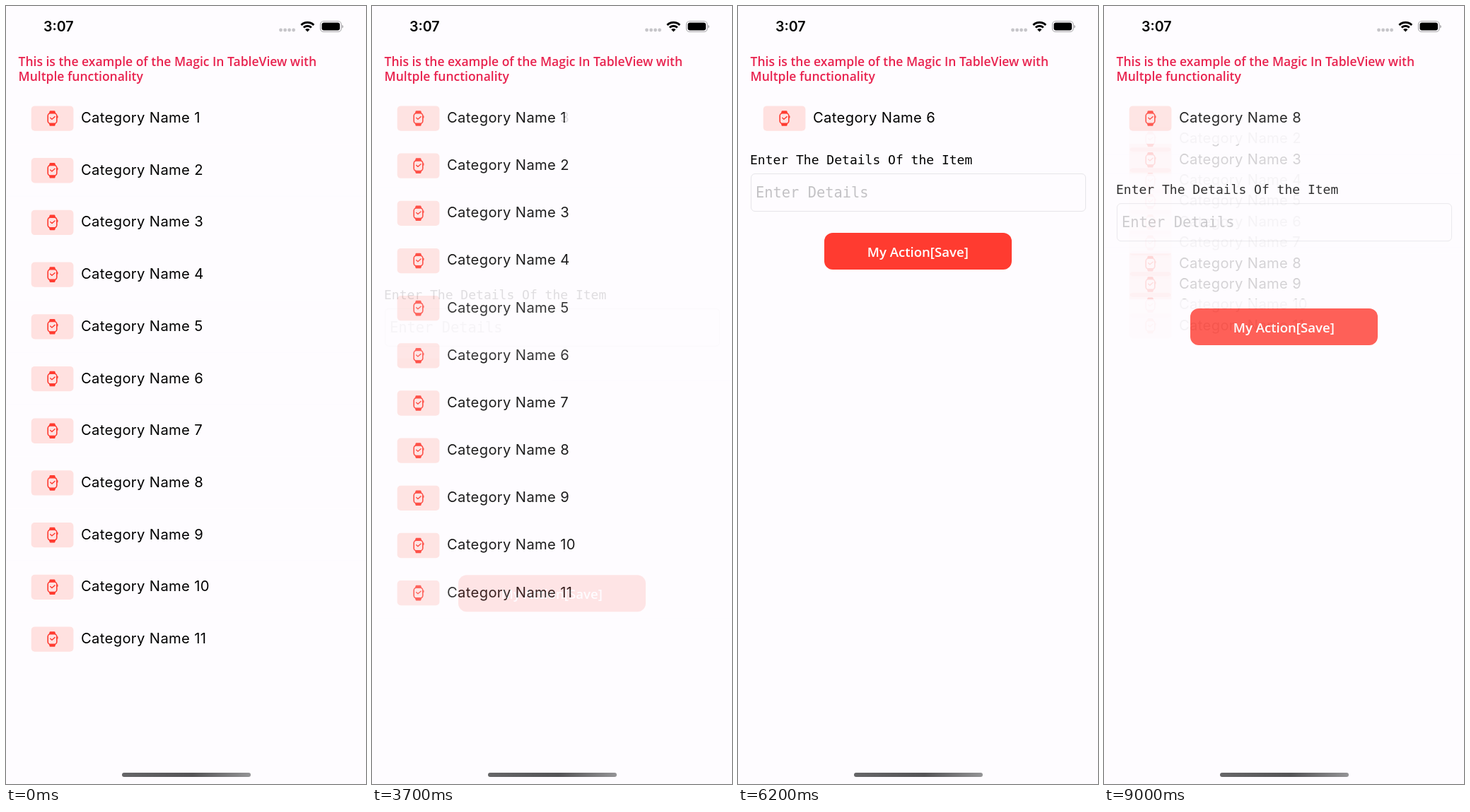
An HTML page that plays this animation: 509 px wide and 1101 px high, repeating every 9100 ms.

```html
<!DOCTYPE html>
<html lang="en">
<head>
<meta charset="utf-8">
<title>Expanding category list</title>
<style>
  :root { --bg: #fefcff; --red: #ff3b30; }
  html, body { margin: 0; width: 100%; height: 100%; overflow: hidden; background: var(--bg); }
  #stage {
    position: relative; width: 509px; height: 1101px; overflow: hidden;
    background: var(--bg); color: #000; font-family: Inter, sans-serif;
    font-optical-sizing: none; white-space: pre;
  }
  #stage div, #stage svg { position: absolute; box-sizing: border-box; }
  #clock { left: 53px; top: 17px; font-size: 19.6px; line-height: 24px; font-weight: 600; }
  #status { left: 380px; top: 14px; }
  #title {
    left: 17.5px; top: 67.8px; color: #e8234f;
    font: 600 17.5px/20.7px "Open Sans", sans-serif;
  }
  #home {
    left: 164px; top: 1085px; width: 182px; height: 6px; border-radius: 3px;
    background: linear-gradient(90deg, #666668, #545456 55%, #949496);
  }
  .layer { left: 0; top: 0; }
  .cell { left: 0; width: 509px; background: var(--bg); }
  .row { top: 121.7px; height: 73.7px; }
  .tile { left: 35px; top: 18px; }
  .name { left: 106px; top: 23.8px; font-size: 20.2px; line-height: 26px; letter-spacing: .35px; }
  .form { top: 195px; height: 112.5px; }
  .label { left: 17px; top: 10.5px; font: 18px/24px "DejaVu Sans Mono", monospace; }
  .field {
    left: 17.5px; top: 42px; width: 474px; height: 54px; padding-left: 6.5px;
    border: 1px solid #e6e5e9; border-radius: 6px; color: #c3c2c5;
    font: 20.4px/52px "DejaVu Sans Mono", monospace;
  }
  .action { top: 307.5px; height: 80px; }
  .button {
    left: 122px; top: 13px; width: 264.5px; height: 52.5px; border-radius: 12px;
    background: var(--red); color: #fff; text-align: center;
    font: 600 18.6px/54px "Open Sans", sans-serif;
  }
</style>
</head>
<body>
<div id="stage">
  <div id="clock">3:07</div>
  <svg id="status" width="110" height="30" viewBox="380 14 110 30">
    <g fill="#c6c5c9">
      <circle cx="388.5" cy="34" r="2.4"/><circle cx="394.6" cy="34" r="2.4"/>
      <circle cx="400.6" cy="34" r="2.4"/><circle cx="406.6" cy="34" r="2.4"/>
    </g>
    <g fill="none" stroke="#000" stroke-width="2.9">
      <path d="M417.4 27a12.6 12.6 0 0 1 17.8 0"/>
      <path d="M420.8 30.5a7.8 7.8 0 0 1 11 0"/>
    </g>
    <path d="M426.3 36.4l-3.2-3.2a4.6 4.6 0 0 1 6.4 0z"/>
    <rect x="444.5" y="21.5" width="29.5" height="15" rx="4.6" fill="none" stroke="#aaa9ac" stroke-width="1.2"/>
    <rect x="446.5" y="23.4" width="25.5" height="11.2" rx="3"/>
    <path d="M475.2 26.8q1.8 .7 1.8 2.3t-1.8 2.3z" fill="#aaa9ac"/>
  </svg>
  <div id="title">This is the example of the Magic In TableView with
Multple functionality</div>
  <div id="list" class="layer"></div>
  <div id="detail" class="layer"></div>
  <div id="home"></div>
</div>
<script>
const LOOP = 9100, STEP = 100, DURATION = 350;
const ROWS = 11, OPEN_GAP = 73.7, CLOSED_GAP = 18.65;

// Moments when a category is picked (opens its form) or dismissed.
const EVENTS = [
  { at: 1540, pick: 1 }, { at: 2558 },
  { at: 3616, pick: 3 }, { at: 4832 },
  { at: 5840, pick: 6 }, { at: 7340 },
  { at: 8757, pick: 8 }
];

const TILE = `<svg class="tile" width="62" height="38" viewBox="-30.5 -19 62 38">
  <rect x="-29.8" y="-17.6" width="59.7" height="35.3" rx="5" fill="#ffe1e0"/>
  <g fill="none" stroke="#ff3b30" stroke-width="1.6" stroke-linecap="round" stroke-linejoin="round">
    <rect x="-6.3" y="-7.3" width="12.6" height="14.6" rx="3.6"/>
    <path d="M-2.8 -.8L-.6 1.2L3.6 -2.4" stroke-width="1.4"/>
    <path d="M7.3 -3.2V-1" stroke-width="1.3"/>
  </g>
  <path fill="#ff3b30" d="M-4.8 -7l1-3.2q.2-.6.9-.6h5.8q.7 0 .9.6l1 3.2zM-4.8 7l1 3.2q.2.6.9.6h5.8q.7 0 .9-.6l1-3.2z"/>
</svg>`;

const list = document.getElementById("list");
const detail = document.getElementById("detail");

function addCell(parent, kind, html) {
  const cell = document.createElement("div");
  cell.className = "cell " + kind;
  cell.innerHTML = html;
  parent.append(cell);
  return cell;
}

const rowHtml = n => `${TILE}<div class="name">Category Name ${n}</div>`;

const rows = Array.from({ length: ROWS }, (_, i) => addCell(list, "row", rowHtml(i + 1)));
const header = addCell(detail, "row", rowHtml(1));
const form = addCell(detail, "form",
  '<div class="label">Enter The Details Of the Item</div><div class="field">Enter Details</div>');
const action = addCell(detail, "action", '<div class="button">My Action[Save]</div>');
const headerName = header.querySelector(".name");

// Ease-in-out: cubic Bezier (.42, 0, .58, 1), solved by bisection.
function ease(x) {
  if (x <= 0) return 0;
  if (x >= 1) return 1;
  let low = 0, high = 1, u = 0.5;
  for (let i = 0; i < 24; i++) {
    const v = 1 - u;
    if (1.26 * u * v * v + 1.74 * u * u * v + u * u * u < x) low = u; else high = u;
    u = (low + high) / 2;
  }
  return u * u * (3 - 2 * u);
}

function place(cell, y, alpha) {
  cell.style.transform = `translateY(${y.toFixed(2)}px)`;
  cell.style.opacity = alpha.toFixed(4);
}

function render(time) {
  let spread = 1, picked = 1, opening = true;
  for (const { at, pick } of EVENTS) {
    if (time < at) break;
    const progress = ease((time - at) / DURATION);
    opening = pick !== undefined;
    spread = opening ? 1 - progress : progress;
    if (opening) picked = pick;
  }
  // Incoming cells always lie above outgoing ones.
  list.style.zIndex = opening ? 1 : 2;
  detail.style.zIndex = opening ? 2 : 1;
  headerName.textContent = "Category Name " + picked;

  const gap = CLOSED_GAP + (OPEN_GAP - CLOSED_GAP) * spread;
  rows.forEach((row, i) => place(row, i * gap, spread));
  place(header, 0, 1 - spread);
  place(form, 216.5 * spread, 1 - spread);
  place(action, 549.5 * spread, 1 - spread);
}

function tick() {
  const time = performance.now() % LOOP;
  render(Math.floor(time / STEP) * STEP);
  requestAnimationFrame(tick);
}
tick();
</script>
</body>
</html>
```
